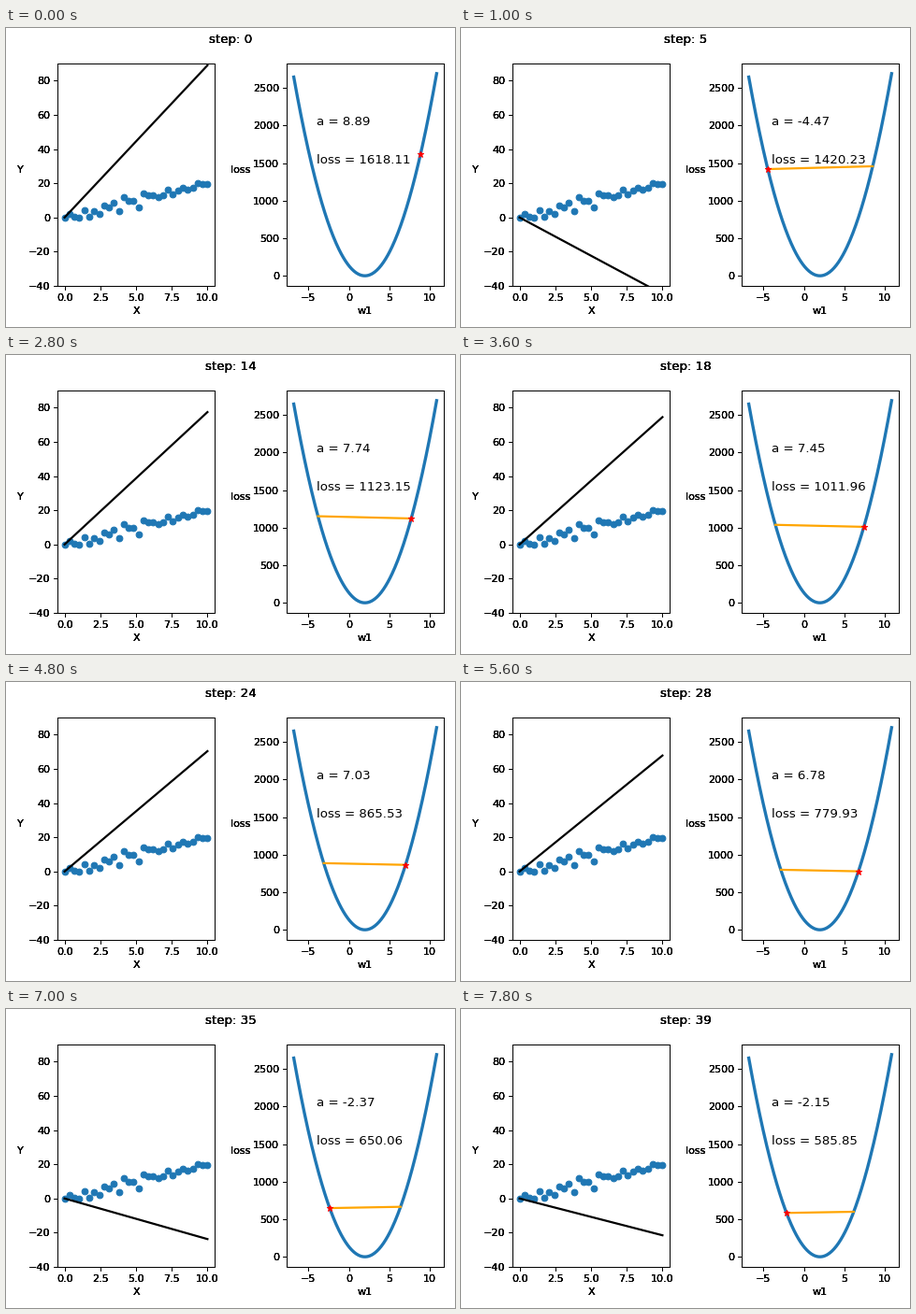
A matplotlib script that plays this animation: 480x320 px, repeating every 8 s.

```python
import numpy as np
import matplotlib.pyplot as plt
from matplotlib.animation import FuncAnimation

W, H, DPI = 480, 320, 80
STEPS, INTERVAL = 40, 200
LAYERS = 4  # labels outside the plots are stacked to look heavier

# Gradient descent that overshoots the minimum on every step
BEST, OFFSET = 1.992, 6.90056
SHRINK = 0.987011
SPREAD, FLOOR = 1614.612, 3.5


def slope(step):
    return BEST + OFFSET * (-SHRINK) ** step


def loss(a):
    return FLOOR + SPREAD * ((a - BEST) / OFFSET) ** 2


fig = plt.figure(figsize=(W / DPI, H / DPI), dpi=DPI, facecolor="white")


def panel(left, xlim, ylim, xticks, yticks, xlabel):
    """Stack identical frames and return the lowest one."""
    box = [left / W, 1 - 276 / H, 168 / W, 238 / H]
    axes = []
    for i in range(LAYERS):
        ax = fig.add_axes(box, facecolor="white" if i == 0 else "none")
        ax.set(xlim=xlim, ylim=ylim, xticks=xticks, yticks=yticks,
               xlabel=xlabel)
        axes.append(ax)
    return axes[0]


def heavy_text(x, y, text, **style):
    return [fig.text(x / W, 1 - y / H, text, **style) for _ in range(LAYERS)]


# Data and fitted line
fit = panel(55, (-0.5, 10.5), (-40, 90), np.arange(0, 10.1, 2.5),
            range(-40, 81, 20), "X")
x = np.linspace(0, 10, 30)
y = [0, 2.0, 0.4, 0, 4.2, 0.4, 3.7, 2.1, 7.0, 5.9,
     8.6, 3.7, 11.9, 9.7, 9.7, 5.9, 14.1, 13.0, 13.0, 11.9,
     13.0, 16.2, 13.5, 15.7, 17.3, 16.2, 17.3, 20.1, 19.5, 19.5]
fit.scatter(x, y)
fit_line, = fit.plot([], [], color="black", lw=2)

# Loss curve and descent
w = np.linspace(-6.83, 10.89, 200)
curve = loss(w)
pad_x = 0.05 * np.ptp(w)
pad_y = 0.05 * np.ptp(curve)
descent = panel(300, (w[0] - pad_x, w[-1] + pad_x),
                (curve.min() - pad_y, curve.max() + pad_y),
                range(-5, 11, 5), range(0, 2501, 500), "w1")
descent.plot(w, curve, lw=3)
jump, = descent.plot([], [], color="orange", lw=2)
star, = descent.plot([], [], "r*")
a_text = descent.text(-4, 2000, "", fontsize=12)
loss_text = descent.text(-4, 1500, "", fontsize=12)

heavy_text(15.5, 157, "Y", ha="center", va="bottom")
heavy_text(251, 157, "loss", ha="center", va="bottom")
titles = heavy_text(240, 6.4, "", ha="center", va="top", fontsize=12)


def update(step):
    a = slope(step)
    for title in titles:
        title.set_text(f"step: {step}")
    fit_line.set_data([0, 10], [0, 10 * a])
    path = np.array([slope(s) for s in range(max(step - 1, 0), step + 1)])
    jump.set_data(path, loss(path))
    star.set_data([a], [loss(a)])
    a_text.set_text(f"a = {a:.2f}")
    loss_text.set_text(f"loss = {loss(a):.2f}")
    return [fit_line, jump, star, a_text, loss_text, *titles]


anim = FuncAnimation(fig, update, frames=STEPS, interval=INTERVAL,
                     repeat=True, repeat_delay=0, blit=False)
plt.show()
```
